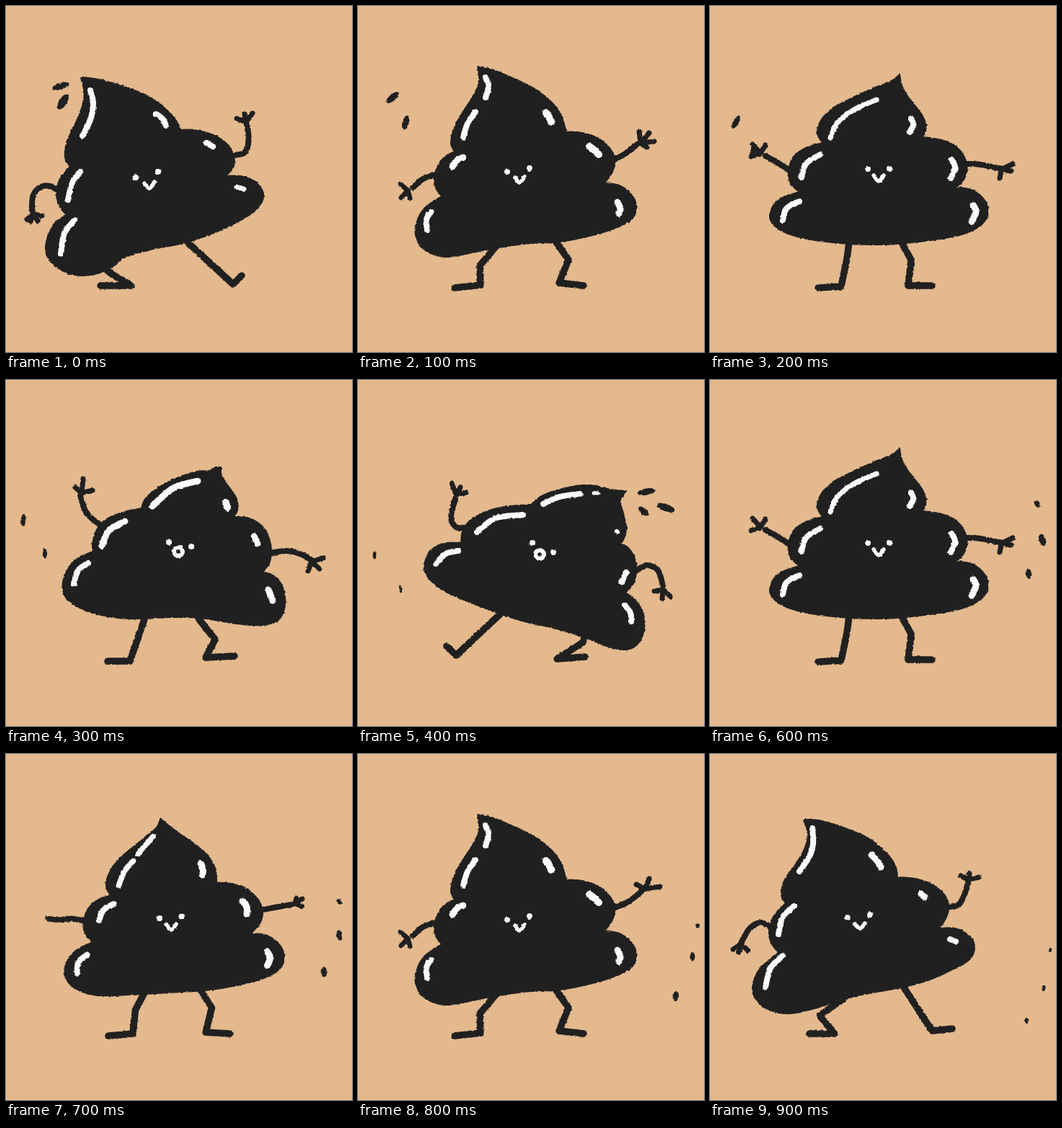
An HTML page that plays this animation: 480x480 px, repeating every 1000 ms.

```html
<!DOCTYPE html>
<html lang="en">
<head>
<meta charset="utf-8">
<title>Wobbly dance</title>
<style>
html, body { margin: 0; width: 100%; height: 100%; overflow: hidden; background: #e4b98e; }
svg { display: block; width: 100vw; height: 100vh; }
</style>
</head>
<body>
<svg id="stage" viewBox="0 0 480 480" xmlns="http://www.w3.org/2000/svg">
  <filter id="chalk" x="0" y="0" width="480" height="480" filterUnits="userSpaceOnUse" color-interpolation-filters="sRGB">
    <feTurbulence type="fractalNoise" baseFrequency=".28" numOctaves="2" seed="4"/>
    <feDisplacementMap in="SourceGraphic" scale="3" xChannelSelector="R" yChannelSelector="G"/>
  </filter>
</svg>
<script>
const INK = '#202020', WHITE = '#fafafa', STEP = 100;
const stage = document.getElementById('stage');

// body: smooth runs between the corners, clockwise from the tip
// shine: width, then points; hands: palm, then fingertips
const farLeft = {
  body: ['104 100 118 100 140 105 170 114 200 127 225 146 238 162 242 172',
    '242 172 260 172 285 178 305 190 315 205 316 222 305 236',
    '305 236 325 236 345 243 356 257 355 272 343 286 320 300 290 314 250 328 200 338 165 348 148 361 130 370 105 374 80 368 60 352 55 335 60 315 70 299 84 290',
    '84 290 74 277 70 258 76 238 89 223',
    '89 223 82 210 84 190 92 172 102 150 108 130 108 115 104 100'],
  shine: ['8 117 117 121 135 117 158 106 180', '8 208 150 217 156 222 166', '8 278 190 287 195',
    '8 103 230 92 245 86 269', '8 95 297 81 315 76 344', '7 320 251 330 254'],
  eyes: '180 238 211 230', mouth: '192 246 199 253 206 244',
  arms: ['72 256 62 250 48 251 38 262 36 280 38 287', '316 207 330 204 336 192 336 175 333 162'],
  hands: ['38 289 29 296 34 299 44 298 50 291', '333 161 320 156 331 150 342 149'],
  legs: ['136 363 147 372 174 388 131 388', '252 328 315 386 327 374']
};
const midLeft = {
  body: ['166 84 185 88 210 98 240 112 265 130 281 150 289 175',
    '289 175 305 175 330 182 348 196 356 212 353 230 341 246',
    '341 246 360 248 378 260 386 277 381 294 362 306 325 318 280 327 230 330 178 338 125 348 95 340 81 322 81 302 92 281 116 264',
    '116 264 107 250 107 232 115 215 124 207 134 202',
    '134 202 129 190 134 168 145 148 158 128 167 110 168 97 166 84'],
  shine: ['8 177 99 181 112 177 127', '8 163 147 152 163 146 182', '10 261 148 265 154 268 161',
    '10 321 195 328 200 334 206', '9 146 210 137 214 131 223', '8 101 286 95 296 96 311', '9 360 272 364 281 362 288'],
  eyes: '207 230 238 225', mouth: '218 238 224 245 231 237',
  arms: ['106 234 90 240 76 252', '354 214 372 204 387 192'],
  hands: ['69 256 59 247 60 266 72 267', '392 190 390 174 404 176 411 188 401 196'],
  legs: ['192 333 169 360 170 387 134 391', '275 328 292 352 279 384 313 388']
};
const midLeftWave = { ...midLeft,
  arms: [midLeft.arms[0], '354 214 375 205 393 191'],
  hands: [midLeft.hands[0], '398 187 386 181 404 173 419 184']
};
const upright = {
  body: ['263 95 266 110 274 125 285 139 295 153 300 168 295 182',
    '295 182 318 185 340 194 354 212 356 230 348 246 337 252',
    '337 252 360 254 378 266 386 284 378 302 355 315 320 323 280 328 235 331 180 329 130 322 98 311 84 297 86 280 100 266 124 258',
    '124 258 112 246 109 228 117 208 135 196 156 190',
    '156 190 149 176 155 157 172 141 200 126 230 113 252 104 263 95'],
  shine: ['7 231 130 207 140 190 150', '7 190 150 176 163 167 183', '8 279 156 282 165 277 175',
    '8 335 213 340 224 334 239', '8 153 206 133 219 127 238', '8 124 271 106 281 101 297', '9 365 276 369 285 363 299'],
  eyes: '219 226 249 226', mouth: '227 235 234 243 241 235',
  arms: ['112 229 93 217 77 208', '352 219 375 220 405 226'],
  hands: ['70 204 57 209 59 192 77 193', '404 227 420 219 418 229 402 239'],
  legs: ['193 328 190 350 182 389 150 391', '266 329 279 352 275 388 308 388']
};
const midRight = {
  body: ['298 121 299 133 309 148 320 165 321 180 316 190',
    '316 190 338 192 358 206 367 228 366 252 356 266',
    '356 266 372 272 384 288 387 312 378 333 355 340 320 338 270 330 230 329 170 331 120 323 88 307 79 290 82 270 96 250 120 238',
    '120 238 121 222 128 204 145 190 168 182 188 178',
    '188 178 194 164 215 147 240 135 265 127 282 126 291 121 298 121'],
  shine: ['9 266 140 232 150 203 175', '10 305 170 307 177', '9 344 217 349 227', '9 165 196 143 209 133 230',
    '8 114 254 100 264 94 283', '9 364 291 370 306'],
  eyes: '226 225 257 231', mouth: '239 238',
  arms: ['132 202 112 185 103 160', '368 240 390 237 410 242 424 250'],
  hands: ['105 157 96 149 107 137 120 153', '424 252 440 247 435 262 419 265'],
  legs: ['192 332 172 390 141 390', '267 331 290 360 277 385 317 383']
};
const farRight = {
  body: ['372 154 364 168 368 185 372 205 368 222 362 227',
    '362 227 374 232 384 248 386 265 382 282 371 295',
    '371 295 385 306 396 325 396 350 385 369 368 374 345 369 315 357 275 345 220 332 170 314 125 295 99 276 92 258 100 238 118 227 143 226',
    '143 226 146 206 160 192 185 180 212 175 240 173',
    '240 173 255 161 280 152 310 146 330 147 350 152 372 154'],
  shine: ['8 308 158 280 162 257 172', '5 327 157 333 157', '6 359 210 360 211', '8 229 187 190 192 165 211',
    '8 139 237 122 241 108 255', '8 372 267 366 280', '8 370 312 378 323 379 335'],
  eyes: '242 226 271 239', mouth: '252 242',
  arms: ['150 205 136 204 129 190 135 165', '384 266 400 257 416 264 423 285'],
  hands: ['136 159 130 143 142 149 150 156', '423 291 411 293 422 303 434 301'],
  legs: ['197 325 136 382 123 369', '313 359 312 364 276 387 315 384']
};
const nearLeft = {
  body: ['130 91 150 92 185 102 220 117 245 138 257 155 260 171',
    '260 171 285 173 310 182 327 198 331 215 325 232 316 242',
    '316 242 340 242 360 253 367 268 360 285 338 298 305 313 265 324 225 331 185 340 145 353 110 360 80 354 62 337 60 318 70 297 95 275',
    '95 275 85 262 82 245 88 226 105 207',
    '105 207 99 195 104 174 119 153 131 132 136 112 130 91'],
  shine: ['8 142 103 143 125 138 142 124 163', '9 224 140 230 146 237 157', '9 293 194 298 199',
    '8 117 211 101 226 95 250', '8 101 280 84 297 77 323', '8 333 257 341 260'],
  eyes: '191 227 222 223', mouth: '201 236 208 242 215 235',
  arms: ['84 240 70 234 55 242 44 260', '331 212 345 209 353 195 358 178'],
  hands: ['43 264 32 271 40 275 53 273', '358 174 348 169 360 166 373 171'],
  legs: ['187 338 152 363 173 388 138 388', '269 324 308 384 336 381']
};

// drops: x, y, length, width, angle
const leftDrops = [
  ['76 111 24 9 -17', '79 133 24 11 -58'],
  ['48 127 22 9 -40', '66 162 20 9 -75'],
  null,
  ['24 195 16 7 -85', '54 240 15 6 -92'],
  ['23 243 11 5 -90', '59 290 11 4 -95']
];
const rightDrops = [
  ['400 155 25 9 -10', '427 177 26 10 20', '396 182 17 9 40'],
  null,
  ['454 172 12 7 55', '461 222 17 9 70', '442 269 14 8 85'],
  null,
  ['471 238 6 5 40', '464 281 12 7 90', '441 336 14 8 95'],
  ['472 272 6 4 100', '463 325 8 5 100', '439 370 8 5 90']
];

// Halfway blend of two equally built data sets
function blend(a, b) {
  const other = JSON.stringify(b).match(/-?\d+/g);
  let i = 0;
  return JSON.parse(JSON.stringify(a).replace(/-?\d+/g, n => (+n + +other[i++]) / 2));
}
const fill = list => list.map((d, i) => d || blend(list[i - 1], list[i + 1]));
const left = fill(leftDrops), right = fill(rightDrops);

const poses = [farLeft, midLeft, upright, midRight, farRight, midRight, upright,
  blend(upright, midLeftWave), midLeftWave, nearLeft];

const nums = s => s.split(' ').map(Number);
function pairs(s) {
  const n = Array.isArray(s) ? s : nums(s), out = [];
  for (let i = 0; i < n.length; i += 2) out.push([n[i], n[i + 1]]);
  return out;
}

// Catmull-Rom run through the points
function curve(p) {
  let d = '';
  for (let i = 0; i < p.length - 1; i++) {
    const a = p[i - 1] || p[i], b = p[i], c = p[i + 1], e = p[i + 2] || c;
    const k = j => [b[j] + (c[j] - a[j]) / 6, c[j] - (e[j] - b[j]) / 6];
    const [x1, x2] = k(0), [y1, y2] = k(1);
    d += `C${x1} ${y1} ${x2} ${y2} ${c[0]} ${c[1]}`;
  }
  return d;
}
const run = p => `M${p[0].join(' ')}` + curve(p);

function add(parent, tag, attrs) {
  const el = document.createElementNS(stage.namespaceURI, tag);
  for (const k in attrs) el.setAttribute(k, attrs[k]);
  return parent.appendChild(el);
}
const line = (g, d, width, stroke = INK) => add(g, 'path', {
  d, stroke, 'stroke-width': width, fill: 'none', 'stroke-linecap': 'round', 'stroke-linejoin': 'round'
});
const dot = (g, [cx, cy], r, color) => add(g, 'circle', { cx, cy, r, fill: color });

function draw(pose, drops) {
  const g = add(stage, 'g', { filter: 'url(#chalk)', display: 'none' });
  pose.legs.forEach(s => line(g, 'M' + pairs(s).join('L'), 9.5));
  pose.arms.forEach(s => line(g, run(pairs(s)), 8));
  pose.hands.forEach(s => {
    const [palm, ...tips] = pairs(s);
    tips.forEach(t => line(g, `M${palm}L${t}`, 7));
  });

  const runs = pose.body.map(pairs);
  add(g, 'path', {
    d: `M${runs[0][0].join(' ')}` + runs.map(curve).join('') + 'Z',
    fill: INK, stroke: INK, 'stroke-width': 2, 'stroke-linejoin': 'round'
  });
  pose.shine.forEach(s => {
    const [w, ...pts] = nums(s);
    line(g, run(pairs(pts)), w, WHITE);
  });

  pairs(pose.eyes).forEach(p => dot(g, p, 4, WHITE));
  const mouth = pairs(pose.mouth);
  if (mouth.length > 1) {
    line(g, run(mouth), 5.5, WHITE);
  } else {
    dot(g, mouth[0], 9, WHITE);
    dot(g, mouth[0], 2.8, INK);
  }

  drops.map(nums).forEach(([x, y, len, w, a]) => add(g, 'ellipse', {
    rx: len / 2, ry: w / 2, fill: INK, transform: `translate(${x} ${y}) rotate(${a})`
  }));
  return g;
}

const scenes = poses.map((p, i) => draw(p, [...(left[i] || []), ...(right[i - 4] || [])]));
let shown = -1;
const start = performance.now();
function tick() {
  const t = Math.max(0, performance.now() - start);
  const i = Math.floor(t / STEP) % scenes.length;
  if (i !== shown) {
    scenes.forEach((g, k) => g.setAttribute('display', k === i ? 'inline' : 'none'));
    shown = i;
  }
  requestAnimationFrame(tick);
}
tick();
</script>
</body>
</html>
```
